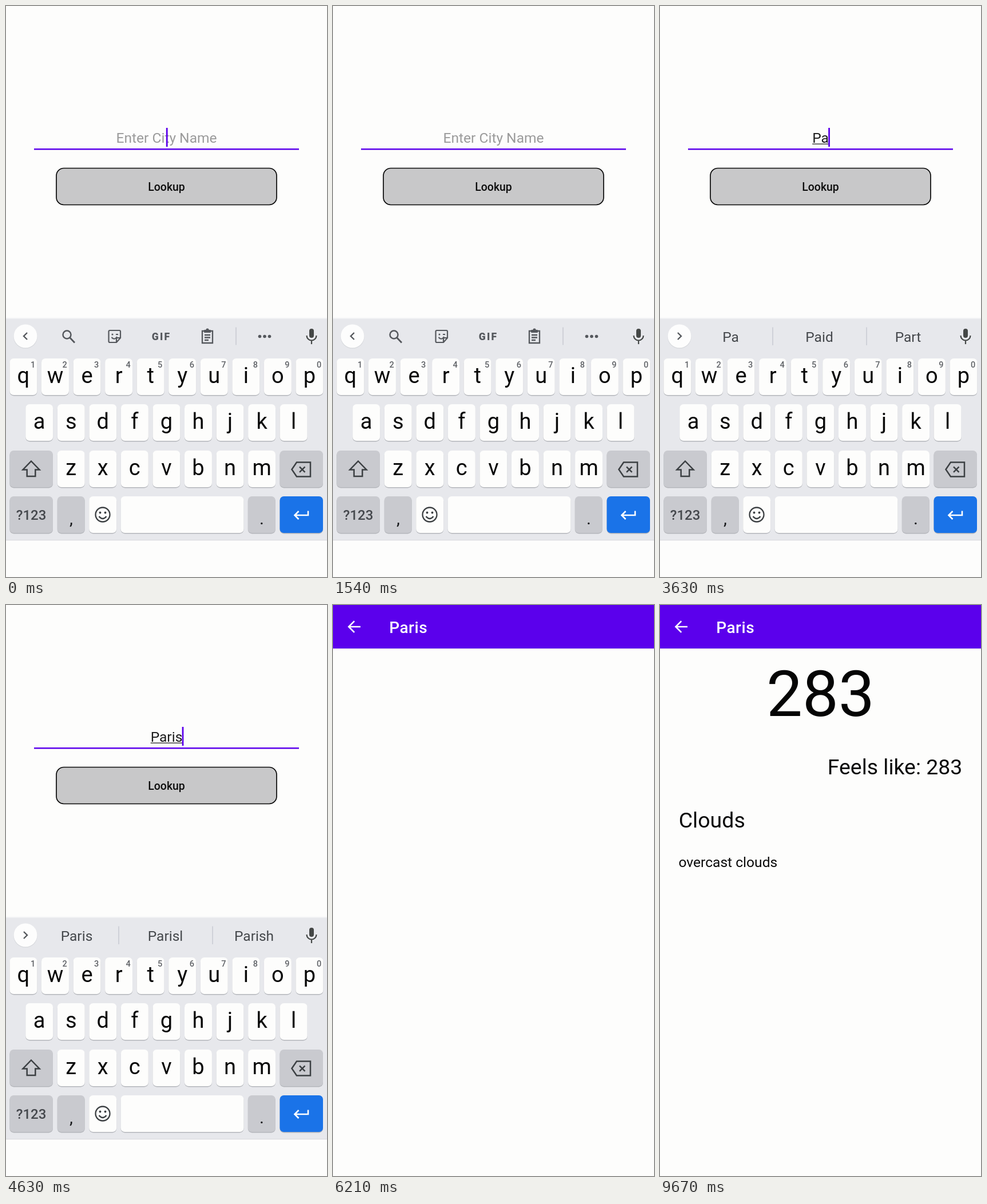
Write an HTML page with a canvas that moves like this. It is 561 px wide and 998 px high and loops after 9710 ms.

```html
<!DOCTYPE html>
<html lang="en">
<head>
<meta charset="utf-8">
<title>City weather lookup</title>
<style>
html, body { margin: 0; width: 100%; height: 100%; overflow: hidden; background: #fdfdfc; }
canvas { display: block; }
</style>
</head>
<body>
<canvas id="stage" width="561" height="998"></canvas>
<script>
const W = 561, H = 998, LOOP = 9710;
const ctx = document.getElementById('stage').getContext('2d');

const BG = '#fdfdfc', PURPLE = '#5b00ec', INK = '#3c4043';
const CITY = 'Paris';
const TIME = {
  shift: 2880, type: 3180, keyGap: 270,
  hide: 4850, hidden: 5080,
  press: 5140, click: 5290,
  open: 5380, opened: 5680,
  data: 7000
};
const SUGGEST = [
  ['P', 'Please', 'Perfect'],
  ['Pa', 'Paid', 'Part'],
  ['Par', 'Part', 'Party'],
  ['Pari', 'Paris', 'Parish'],
  ['Paris', 'Parisl', 'Parish']
];

const clamp01 = v => Math.max(0, Math.min(1, v));
const progress = (t, a, b) => clamp01((t - a) / (b - a));

function text(s, x, y, size, color, align = 'center', weight = 400, spacing = 0) {
  ctx.font = `${weight} ${size}px Roboto, sans-serif`;
  ctx.letterSpacing = spacing + 'px';
  ctx.textAlign = align;
  ctx.fillStyle = color;
  ctx.fillText(s, x, y);
}

function box(x, y, w, h, r, color) {
  ctx.fillStyle = color;
  ctx.beginPath();
  ctx.roundRect(x, y, w, h, r);
  ctx.fill();
}

function disc(x, y, r, color) {
  ctx.fillStyle = color;
  ctx.beginPath();
  ctx.arc(x, y, r, 0, Math.PI * 2);
  ctx.fill();
}

function line(d, color = INK, width = 2.4) {
  ctx.strokeStyle = color;
  ctx.lineWidth = width;
  ctx.stroke(new Path2D(d));
}

function ring(x, y, r, color, width) {
  ctx.strokeStyle = color;
  ctx.lineWidth = width;
  ctx.beginPath();
  ctx.arc(x, y, r, 0, Math.PI * 2);
  ctx.stroke();
}

function key(x, y, w, color = '#fdfdfc') {
  box(x, y + 1.4, w, 64, 7, '#b4b6bb');
  box(x, y, w, 64, 7, color);
}

function letters(row, x, y, upper) {
  [...row].forEach((c, i) => {
    const left = x + i * 55.56;
    key(left, y, 48);
    text(upper ? c.toUpperCase() : c, left + 24, y + 43, 38, '#080808');
  });
}

function mic() {
  const c = '#444746';
  box(530, 564, 8, 16, 4, c);
  line('M525.5 576 a8.5 8.5 0 0 0 17 0 M534 584.5 V591', c, 2.2);
}

function tools() {
  const c = '#55585d';
  line('M37 571 L31 577 L37 583', c);

  ring(106.5, 574.5, 7, c, 2.5);
  line('M111.5 579.5 L120 588.5', c, 2.8);

  line('M181.5 567 H198 Q200 567 200 569 V580 L193 588 H181.5 Q179.5 588 179.5 586 V569 Q179.5 567 181.5 567 Z M200 580 H195 Q193 580 193 582 V588', c, 2.2);
  disc(186, 574, 1.5, c);
  line('M192 574 H196 M184.5 579 Q189.5 585 194 578', c, 2);

  text('GIF', 271.5, 583.5, 17.5, c, 'center', 900, 2.2);

  line('M344 568 H361 V589 H343 V568 Z M347 575 H357 M347 579.5 H357 M347 584 H354', c, 2.3);
  box(346, 566, 12, 5, 1, c);
  disc(352, 566, 2.6, c);

  line('M402 561.5 V592.5', '#c5c8d0', 1.4);
  for (const x of [443.5, 452, 460.5]) disc(x, 577.5, 2.8, c);
}

function suggestions(words) {
  line('M31 571 L37 577 L31 583', '#55585d');
  words.forEach((w, i) => text(w, 123.5 + i * 155, 587, 24.5, '#45484c'));
  line('M197 561.5 V593 M361 561.5 V593', '#c5c8d0', 1.4);
}

function keyboard(count, upper) {
  const dark = '#c9cacf';
  ctx.fillStyle = '#e7e8ec';
  ctx.fillRect(0, 546, W, 388);
  ctx.fillStyle = '#f1f2f4';
  ctx.fillRect(0, 545, W, 2);
  ctx.fillStyle = '#d9dbdf';
  ctx.fillRect(0, 933, W, 1.2);

  disc(34, 578, 20.8, '#d6d8dc');
  disc(34, 577, 20.5, '#fdfdfd');
  if (count) suggestions(SUGGEST[count - 1]);
  else tools();
  mic();

  letters('qwertyuiop', 6.4, 616, upper);
  for (let i = 0; i < 10; i++) {
    text((i + 1) % 10, 47 + i * 55.56, 632, 14.5, '#5d6065', 'center', 500);
  }
  letters('asdfghjkl', 34.2, 696, upper);
  letters('zxcvbnm', 89.7, 777, upper);

  key(6.4, 777, 75.5, dark);
  const arrow = 'M44 795.5 L58.5 810.5 H51.3 V822 H36.7 V810.5 H29.5 Z';
  line(arrow, INK, 2.5);
  if (upper) {
    ctx.fillStyle = INK;
    ctx.fill(new Path2D(arrow));
  }

  key(478.5, 777, 75.5, dark);
  line('M499.5 810 L508 797.5 H532 V822.5 H508 Z M513 805.3 L522.5 814.8 M522.5 805.3 L513 814.8', INK, 2.5);

  key(6.4, 857, 75.5, dark);
  text('?123', 44, 898, 24, '#45484d', 'center', 500);
  key(89.7, 857, 48, dark);
  text(',', 114, 906, 30, '#16181a');

  key(145.2, 857, 48);
  ring(169, 889, 12.5, INK, 2.3);
  disc(164.5, 885.5, 1.9, INK);
  disc(173.5, 885.5, 1.9, INK);
  line('M162.5 892 Q169 900 175.5 892', INK, 2.3);

  key(200.5, 857, 215);
  key(422.8, 857, 48, dark);
  text('.', 447, 906, 30, '#16181a');
  key(478.5, 857, 75.5, '#1a73e8');
  line('M528 882.5 V890 H505 M511.5 883 L504.5 890 L511.5 897', '#fff', 2.6);
}

function field(t, count) {
  const cleared = t >= TIME.click;
  const value = cleared ? '' : CITY.slice(0, count);
  text(value || 'Enter City Name', W / 2, 239, 24.55, value ? '#1c1c1c' : '#9b9b9b');
  const half = value ? ctx.measureText(value).width / 2 : 0;
  if (value && t < TIME.hide) {
    ctx.fillStyle = '#333';
    ctx.fillRect(W / 2 - half, 240.5, half * 2, 1.4);
  }
  ctx.fillStyle = PURPLE;
  ctx.fillRect(49, 249, 463, 2.5);

  // The caret blink restarts at every edit.
  let since = t;
  if (cleared) since = t - TIME.click;
  else if (count) since = t - TIME.type - (count - 1) * TIME.keyGap;
  if (since % 1000 < 500) ctx.fillRect(W / 2 + half - 0.7, 213, 2.8, 33);
}

function button(t) {
  const lift = progress(t, TIME.press, TIME.press + 100);
  ctx.save();
  if (lift) {
    ctx.shadowColor = `rgba(0,0,0,${0.24 * lift})`;
    ctx.shadowBlur = 9;
    ctx.shadowOffsetY = 3;
  }
  box(88, 283.5, 385, 64, 13, '#c8c8c9');
  ctx.restore();
  ctx.strokeStyle = '#080808';
  ctx.lineWidth = 1.7;
  ctx.stroke();
  text('Lookup', W / 2, 323, 19.4, '#0c0c0c', 'center', 500);
}

function searchScreen(t) {
  const count = t < TIME.type ? 0
    : Math.min(CITY.length, 1 + Math.floor((t - TIME.type) / TIME.keyGap));
  field(t, count);
  button(t);
  if (t < TIME.hidden) {
    const p = progress(t, TIME.hide, TIME.hidden);
    ctx.save();
    ctx.translate(0, 455 * p * p);
    keyboard(count, t >= TIME.shift && t < TIME.type);
    ctx.restore();
  }
}

function weatherScreen(t) {
  ctx.fillStyle = BG;
  ctx.fillRect(0, 0, W, H);
  ctx.fillStyle = '#eeeef0';
  ctx.fillRect(0, 76, W, 1.5);
  ctx.fillStyle = PURPLE;
  ctx.fillRect(0, 0, W, 76);
  line('M48 38 H28 M37.3 28.2 L27.5 38 L37.3 47.8', '#fff', 2.6);
  text(CITY, 98.2, 49, 28, '#fff', 'left', 500, 0.5);
  if (t < TIME.data) return;
  text('283', W / 2, 194, 112, '#050505');
  text('Feels like: 283', 528.3, 295.5, 37.4, '#0a0a0a', 'right');
  text('Clouds', 32.7, 389, 37.5, '#0a0a0a', 'left');
  text('overcast clouds', 32.4, 457.5, 24.6, '#0a0a0a', 'left');
}

function draw(t) {
  ctx.fillStyle = BG;
  ctx.fillRect(0, 0, W, H);
  if (t < TIME.opened) searchScreen(t);
  if (t < TIME.open) return;
  const p = progress(t, TIME.open, TIME.opened);
  const ease = 1 - (1 - p) ** 3;
  const scale = 0.92 + 0.08 * ease;
  ctx.save();
  ctx.globalAlpha = ease;
  ctx.translate(W / 2, H / 2);
  ctx.scale(scale, scale);
  ctx.translate(-W / 2, -H / 2);
  weatherScreen(t);
  ctx.restore();
}

const start = performance.now();
function tick() {
  draw((performance.now() - start) % LOOP);
  requestAnimationFrame(tick);
}
tick();
</script>
</body>
</html>
```
